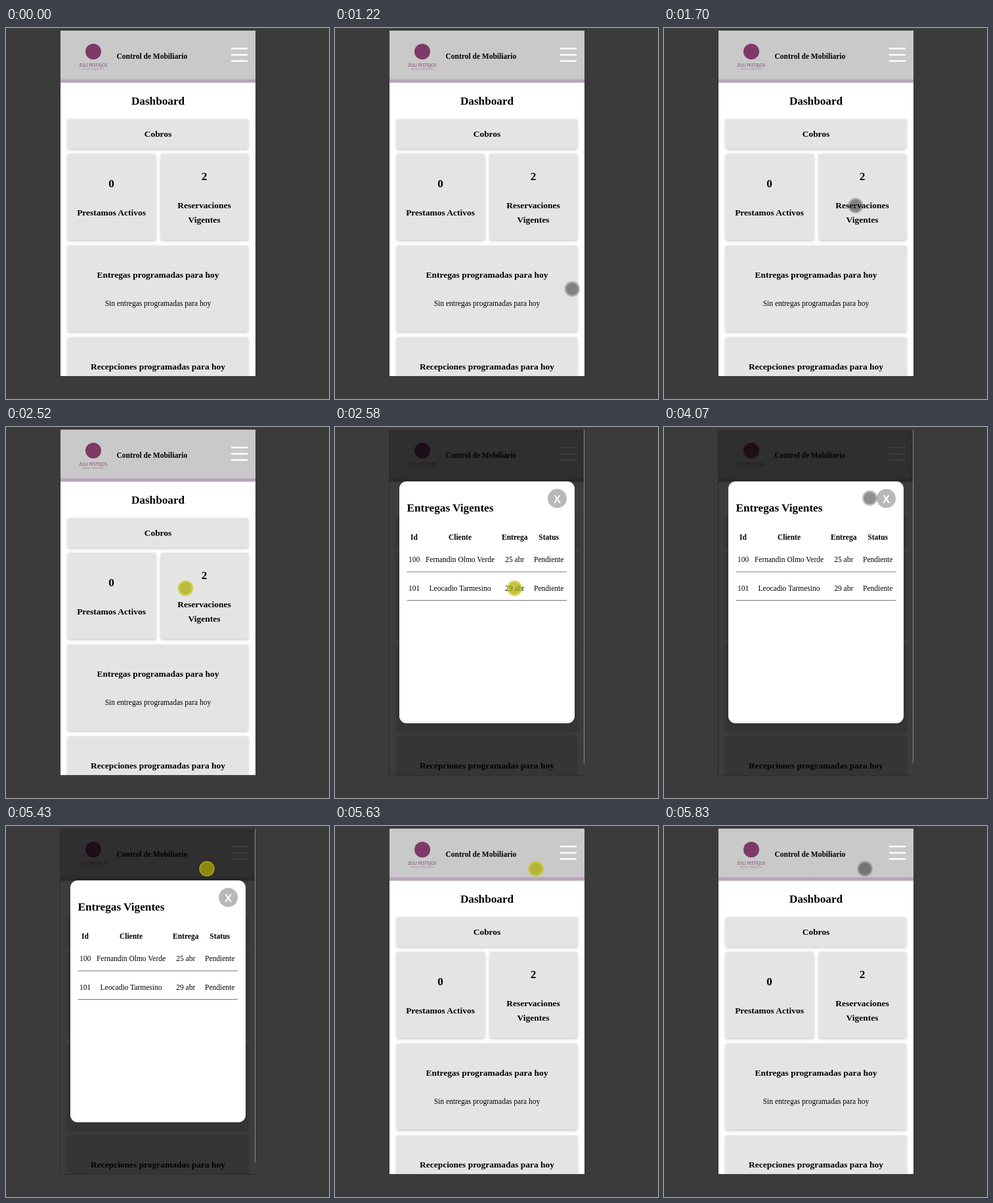
Animation of 492 by 566 pixels, one loop 6.23 s. Source, as an HTML page:

```html
<!DOCTYPE html>
<html lang="es">
<head>
<meta charset="utf-8">
<title>Control de Mobiliario</title>
<style>
  html, body { margin: 0; width: 100%; height: 100%; overflow: hidden; background: #3b3b3b; }
  svg { display: block; width: 492px; height: 566px; }
  text { font: 11.5px "Liberation Serif", "Times New Roman", serif; text-anchor: middle; }
  .b, .h2, .h3 { font-weight: bold; }
  .h2 { font-size: 17.2px; }
  .h3 { font-size: 13.46px; }
  .left { text-anchor: start; }
  .brand { font: 6.4px "Open Sans", sans-serif; fill: #7d3a66; }
  .tag { font: 3.6px "Open Sans", sans-serif; fill: #a58a9c; }
  .close { font: bold 16.5px "Liberation Sans", Arial, sans-serif; fill: #fff; }
</style>
</head>
<body>
<svg viewBox="0 0 492 566">
  <defs>
    <clipPath id="screen"><rect x="83" y="4" width="297" height="527"/></clipPath>
    <filter id="lift" x="-5%" y="-10%" width="110%" height="125%">
      <feDropShadow dx="0" dy="1.5" stdDeviation="2" flood-opacity=".24"/>
    </filter>
    <linearGradient id="edge" x1="0" y1="0" x2="0" y2="1">
      <stop offset="0" stop-color="#c9c9c9"/>
      <stop offset=".4" stop-color="#b7a0ba"/>
      <stop offset=".75" stop-color="#b7a0ba"/>
      <stop offset="1" stop-color="#e2d9e3"/>
    </linearGradient>
  </defs>
  <rect width="492" height="566" fill="#3b3b3b"/>
  <g clip-path="url(#screen)">
    <rect x="83" y="4" width="297" height="527" fill="#fff"/>
    <rect x="83" y="4" width="297" height="74" fill="#c9c9c9"/>
    <rect x="83" y="77" width="297" height="7" fill="url(#edge)"/>
    <circle cx="133" cy="36" r="12" fill="#7d3a66"/>
    <text class="brand" x="133" y="58.5">ZULI FESTEJOS</text>
    <text class="tag" x="133" y="63.5">MESAS Y MANTELES</text>
    <text class="b left" x="168.5" y="47">Control de Mobiliario</text>
    <path d="M344 31.3H367M344 41H367M344 50.2H367" stroke="#fff" stroke-width="2.6" stroke-linecap="round"/>
    <text class="h2" x="231.5" y="117">Dashboard</text>
    <g id="cards" fill="#e4e4e4" filter="url(#lift)"></g>
    <g id="labels"></g>
  </g>
  <g id="modal">
    <rect x="83" y="4" width="297" height="527" fill="#000" fill-opacity=".765"/>
    <path d="M82.5 3V531.5H380" fill="none" stroke="#2c2c2c"/>
    <path d="M379.5 4V513" stroke="#8c8c8c"/>
    <rect x="98" y="83" width="267" height="369" rx="11" fill="#fff"/>
    <circle cx="338.5" cy="109" r="14.5" fill="#b8b8b8"/>
    <text class="close" x="338.5" y="115.5">X</text>
    <text class="h2 left" x="109.5" y="129">Entregas Vigentes</text>
    <g id="table"></g>
    <path d="M109.5 221H353M109.5 264.5H353" stroke="#777"/>
  </g>
  <g id="cursor">
    <circle id="disc" r="9.4"/>
    <circle id="ring" r="10.55" fill="none" stroke-width="2.3"/>
  </g>
</svg>
<script>
const NS = 'http://www.w3.org/2000/svg';
const $ = id => document.getElementById(id);

function add(parent, tag, attrs, text) {
  const el = document.createElementNS(NS, tag);
  for (const k in attrs) el.setAttribute(k, attrs[k]);
  if (text) el.textContent = text;
  parent.appendChild(el);
}

[[94, 139, 275, 45], [94, 192, 134, 131], [236, 192, 133, 131], [94, 332, 275, 131], [94, 472, 275, 131]]
  .forEach(([x, y, width, height]) => add($('cards'), 'rect', { x, y, width, height, rx: 1.5 }));

[
  ['h3', 231.5, 166, 'Cobros'],
  ['h2', 160.5, 243, '0'],
  ['h3', 160.5, 286, 'Prestamos Activos'],
  ['h2', 302, 232, '2'],
  ['h3', 302, 275, 'Reservaciones'],
  ['h3', 302, 297, 'Vigentes'],
  ['h3', 231.5, 381, 'Entregas programadas para hoy'],
  ['', 231.5, 424, 'Sin entregas programadas para hoy'],
  ['h3', 231.5, 521, 'Recepciones programadas para hoy']
].forEach(([cls, x, y, s]) => add($('labels'), 'text', { class: cls, x, y }, s));

const columns = [120.5, 190.5, 273.7, 325.7];
[
  [172, 'Id', 'Cliente', 'Entrega', 'Status'],
  [206, '100', 'Fernandin Olmo Verde', '25 abr', 'Pendiente'],
  [250, '101', 'Leocadio Tarmesino', '29 abr', 'Pendiente']
].forEach(([y, ...cells], row) => cells.forEach((s, i) =>
  add($('table'), 'text', { class: row ? '' : 'b', x: columns[i], y }, s)));

const LOOP = 6230;
const OPEN = 2580, CLOSE = 5630;
const clicks = [[2520, 2650], [5430, 5830]];

// Keys are [ms, x, y]; the pointer moves in discrete ticks.
const moves = [
  { tick: 1180 / 17, keys: [[730, 447, 552], [1220, 360.5, 396.5], [1290, 347, 368], [1910, 273.5, 246]] },
  { tick: 70, keys: [[3440, 274.5, 245.5], [4000, 315.3, 130.5], [4070, 313.5, 108.5], [4490, 306, 65.3]] }
];

// Cubic Hermite curve through the keys, at rest at both ends.
function curve(keys, t, axis) {
  const last = keys.length - 1;
  if (t >= keys[last][0]) return keys[last][axis];
  const span = i => keys[i + 1][0] - keys[i][0];
  const slope = i => (keys[i + 1][axis] - keys[i][axis]) / span(i);
  const tangent = i => i === 0 || i === last ? 0
    : (slope(i - 1) * span(i) + slope(i) * span(i - 1)) / (span(i) + span(i - 1));
  let i = 0;
  while (t >= keys[i + 1][0]) i++;
  const h = span(i), u = (t - keys[i][0]) / h, v = 1 - u;
  return v * v * (1 + 2 * u) * keys[i][axis] + u * u * (3 - 2 * u) * keys[i + 1][axis]
    + h * u * v * (v * tangent(i) - u * tangent(i + 1));
}

function draw(t) {
  $('modal').style.display = t >= OPEN && t < CLOSE ? '' : 'none';
  const move = moves.filter(m => t >= m.keys[0][0]).pop();
  $('cursor').style.display = move ? '' : 'none';
  if (!move) return;
  const { keys, tick } = move, start = keys[0][0];
  const at = start + Math.floor((t - start) / tick + 1e-6) * tick;
  $('cursor').setAttribute('transform', `translate(${curve(keys, at, 1)} ${curve(keys, at, 2)})`);
  const pressed = clicks.some(([a, b]) => t >= a && t < b);
  $('disc').setAttribute('fill', pressed ? 'rgba(172,172,0,.72)' : 'rgba(32,32,32,.5)');
  $('ring').setAttribute('stroke', pressed ? 'rgba(200,200,10,.75)' : 'rgba(32,32,32,.28)');
  if (!pressed && t >= OPEN && t < CLOSE && at >= 4280) $('ring').setAttribute('stroke', 'rgba(150,150,150,.5)');
}

const begin = performance.now();
function frame() {
  draw((performance.now() - begin) % LOOP);
  requestAnimationFrame(frame);
}
frame();
</script>
</body>
</html>
```
